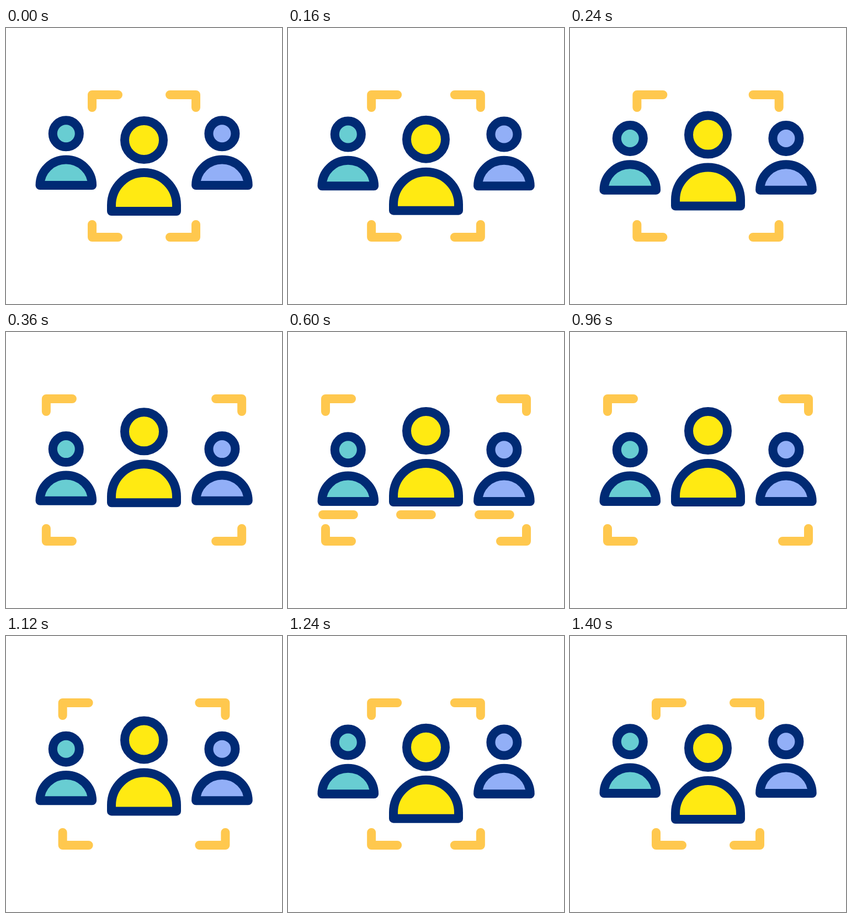
Recreate the animation shown at these times as an HTML page. Size 500x500 px, loop 1.48 s.

```html
<!DOCTYPE html>
<html lang="en">
<head>
<meta charset="utf-8">
<title>Group focus</title>
<style>
  html, body { margin: 0; width: 100%; height: 100%; overflow: hidden; background: #fff; }
  svg { display: block; width: 100vw; height: 100vh; }
  .person { stroke: #002a74; }
  .mark { stroke: #ffc84e; fill: none; }
</style>
</head>
<body>
<svg viewBox="0 0 500 500" stroke-width="16" stroke-linecap="round" stroke-linejoin="round">
  <g class="mark" id="bars"></g>
  <g class="mark" id="left">
    <path d="M156 144V121H203M156 356V379H203"/>
  </g>
  <g class="mark" id="right">
    <path d="M344 144V121H297M344 356V379H297"/>
  </g>
  <g class="person" id="teal" fill="#68cdd2">
    <circle cx="108.8" cy="191.3" r="24"/>
    <path d="M61.5 285A47.3 46.4 0 0 1 156.1 285Z"/>
  </g>
  <g class="person" id="blue" fill="#92aff7">
    <circle cx="391.4" cy="191.3" r="24"/>
    <path d="M344.1 285A47.3 46.4 0 0 1 438.7 285Z"/>
  </g>
  <g class="person" id="main" fill="#ffea12">
    <circle cx="250" cy="203" r="35"/>
    <path d="M191 332V321A59 59 0 0 1 309 321V332Z"/>
  </g>
</svg>
<script>
const LOOP = 1480, STEP = 40, BAR = 92;
const get = id => document.getElementById(id);
const parts = Object.fromEntries(['left', 'right', 'teal', 'blue', 'main', 'bars'].map(id => [id, get(id)]));

// Eased progress from 0 to 1 between two times
function ease(t, from, to) {
  const x = Math.min(1, Math.max(0, (t - from) / (to - from)));
  return x * x * (3 - 2 * x);
}

function move(part, x, y) {
  part.setAttribute('transform', `translate(${x} ${y})`);
}

const bars = [63, 204, 346].map(x => {
  const path = document.createElementNS('http://www.w3.org/2000/svg', 'path');
  parts.bars.append(path);
  return { x, path };
});

function draw(ms) {
  const t = Math.floor((ms % LOOP) / STEP) * STEP;
  const open = ease(t, 120, 400) - ease(t, 1000, 1280);
  const line = BAR * (ease(t, 440, 720) - ease(t, 720, 960));

  move(parts.left, -88 * open, 0);
  move(parts.right, 88 * open, 0);
  move(parts.main, 0, -24 * open);
  move(parts.teal, 0, 22 * open);
  move(parts.blue, 0, 22 * open);
  for (const { x, path } of bars) {
    path.setAttribute('d', line > 0 ? `M${x} 331h${line}` : '');
  }
}

function tick() {
  draw(performance.now());
  requestAnimationFrame(tick);
}
tick();
</script>
</body>
</html>
```
